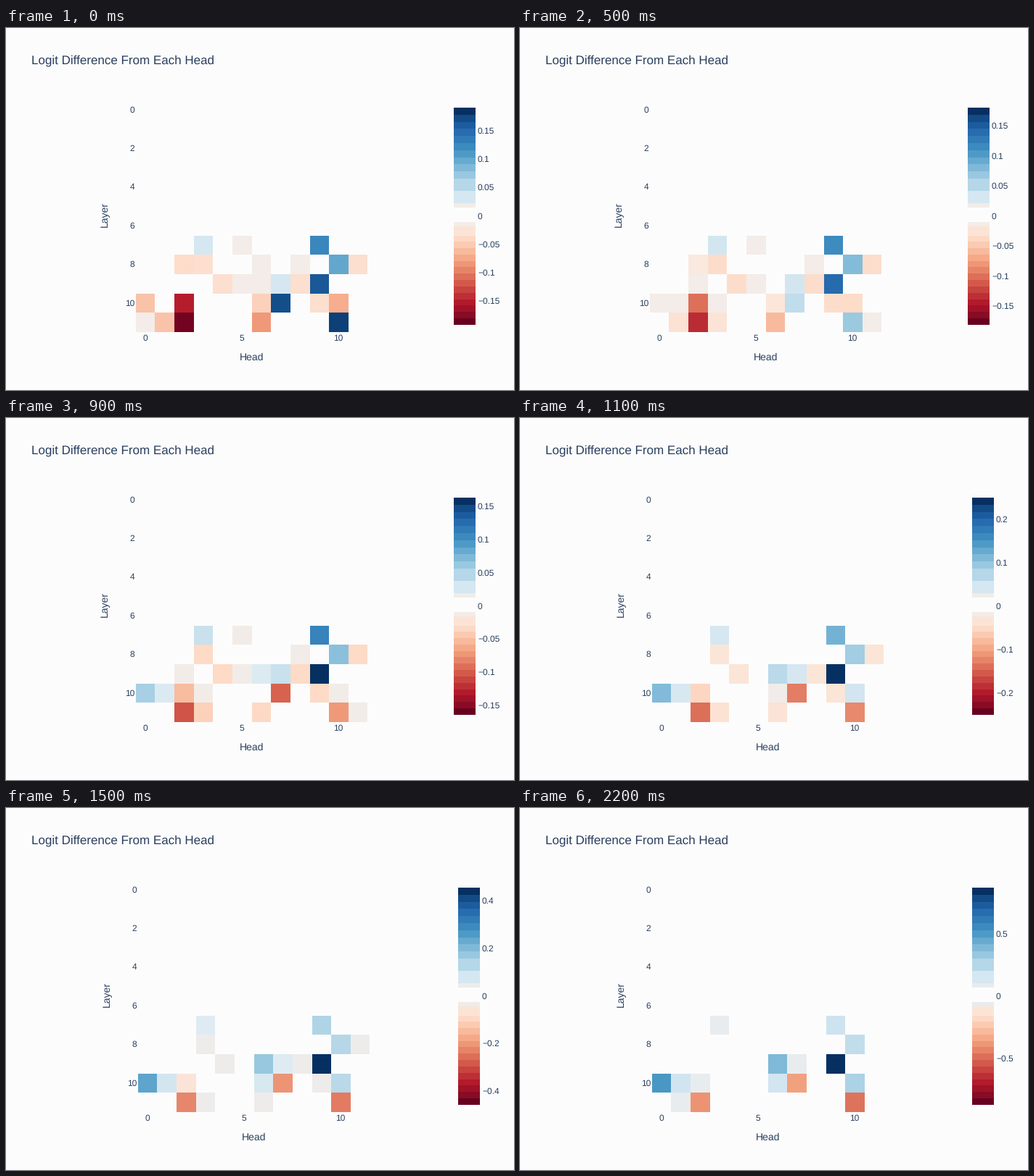
Recreate the animation shown at these times as a matplotlib script. Size 700 by 500 pixels, loop 2300 ms.

```python
import matplotlib.pyplot as plt
import numpy as np
from matplotlib.animation import FuncAnimation

plt.rcParams.update({"font.family": "Liberation Sans", "text.hinting": "none"})

FRAMES, INTERVAL = 23, 100
BG = np.array([252, 252, 252])
INK = "#2a3f5f"

# Diverging red-blue scale, from -1 to 1
SCALE = np.array([
    (103, 0, 31), (178, 24, 43), (214, 96, 77), (244, 165, 130),
    (253, 219, 199), (247, 247, 247), (209, 229, 240), (146, 197, 222),
    (67, 147, 195), (33, 102, 172), (5, 48, 97)])
STOPS = np.linspace(-1, 1, len(SCALE))

# Colour bar bands, in pixels from zero: wide when pale, then even steps
LOWER = np.r_[8, 14, 27, np.linspace(35, 150, 14).round()]
UPPER = np.r_[12, 18, 35, np.linspace(52, 150, 11).round()]
BANDS = np.r_[-LOWER[::-1], UPPER]

# Each head holds a steady value, plus a part that fades out early
# and a part that grows with the peak after the turn
TURN, LOW, HIGH = 7, .118, .872
steady, early, late = np.zeros((3, 12, 12))


def heads(base, fade, grow, *cells):
    for cell in cells:
        steady[cell], early[cell], late[cell] = base, fade, grow


heads(.0155, 0, 0, (7, 5), (8, 8), (9, 5))
heads(.0125, 0, 0, (9, 0), (11, 8))
heads(-.01, 0, 0, (9, 2), (10, 3), (11, 11))
heads(-.033, 0, 0, (8, 3), (8, 11), (9, 4), (9, 8), (10, 9))
heads(0, -.0125, 0, (8, 6), (11, 0))
heads(0, -.036, 0, (8, 2))
heads(.034, 0, .055, (7, 3), (9, 7))
heads(.105, .02, .08, (7, 9))
heads(.059, .04, .16, (8, 10))
heads(0, .018, .39, (9, 6))
heads(LOW, .045, HIGH - LOW, (9, 9))
heads(.025, -.08, .485, (10, 0))
heads(.0145, 0, .16, (10, 1))
heads(-.05, -.1, -.025, (10, 2))
heads(0, -.045, .17, (10, 6))
heads(-.08, .25, -.28, (10, 7))
heads(0, -.07, .28, (10, 10))
heads(0, -.055, .072, (11, 1))
heads(-.085, -.1, -.31, (11, 2))
heads(-.04, .03, .015, (11, 3))
heads(-.033, -.05, -.012, (11, 6))
heads(-.045, .225, -.43, (11, 10))


def state(t):
    """Head values, peak and growth at time t."""
    peak = np.interp(t, [0, 3, TURN, 9, 13, 18, 22],
                     [.191, .243, LOW, .1637, .336, .638, HIGH])
    growth = (peak - LOW) / (HIGH - LOW) if t > TURN else 0
    fade = np.interp(t, [3, TURN], [1, 0])
    return steady + early * fade + late * growth, peak, growth


def tones(share, growth):
    """RGB colours for shares in -1..1, with a blank band around zero."""
    rgb = np.stack([np.interp(share, STOPS, c) for c in SCALE.T], axis=-1)
    px = share * 150
    rgb[(px > -14) & (px < 18)] = 243 - 11 * growth, 236, 232 + 7 * growth
    rgb[(px > -8) & (px < 12)] = BG
    return rgb / 255


def tick_step(peak):
    rough = 2 * peak / 8.5
    return next(s for s in (.02, .05, .1, .2, .5) if rough <= s)


fig = plt.figure(figsize=(7, 5), dpi=100, facecolor=BG / 255)
ax = fig.add_axes([0, 0, 1, 1])


def label(x, y, s, px=12, ha="left", **kw):
    ax.text(x, y - .7, s, size=px * .72, color=INK, ha=ha, va="baseline", **kw)


def blocks(x, y, rgb):
    ax.pcolormesh(x, y, rgb, antialiased=False)


def draw(t):
    ax.clear()
    ax.set(xlim=(0, 700), ylim=(500, 0))
    ax.axis("off")

    z, peak, growth = state(t)
    step = tick_step(peak)
    # Shorter tick labels leave more room for the plot
    dx = 3 if step >= .1 else 0

    left, cell = 178.8 + dx, 319.65 / 12
    edges = np.arange(13)
    blocks(np.round(left + cell * edges), np.round(100 + 320 / 12 * edges),
           tones(z / peak, growth))

    bar = 617 + 2 * dx
    mids = (BANDS[:-1] + BANDS[1:]) / 2 / 150
    mids[0], mids[-1] = -1, 1
    blocks([bar, bar + 30], 260 - BANDS, tones(mids, growth)[:, None])
    n = int(peak / step)
    for v in np.arange(-n, n + 1) * step:
        text = f"{round(abs(v), 2):g}"
        label(bar + 33, 264.2 - v / peak * 150, "\u2212" + text if v < 0 else text)

    label(35, 50, "Logit Difference From Each Head", 17)
    for i in range(0, 12, 2):
        label(left - 1.5, 117.5 + i * 320 / 12, str(i), ha="right")
    for i in (0, 5, 10):
        label(left + cell * (i + .5) - .5, 433, str(i), ha="center")
    label(338.5 + dx, 460, "Head", 14, "center")
    label(140 + dx, 258.4, "Layer", 14, "center", rotation=90,
          rotation_mode="anchor")
    return []


anim = FuncAnimation(fig, draw, frames=FRAMES, interval=INTERVAL,
                     init_func=lambda: draw(0), repeat=True)
plt.show()
```
